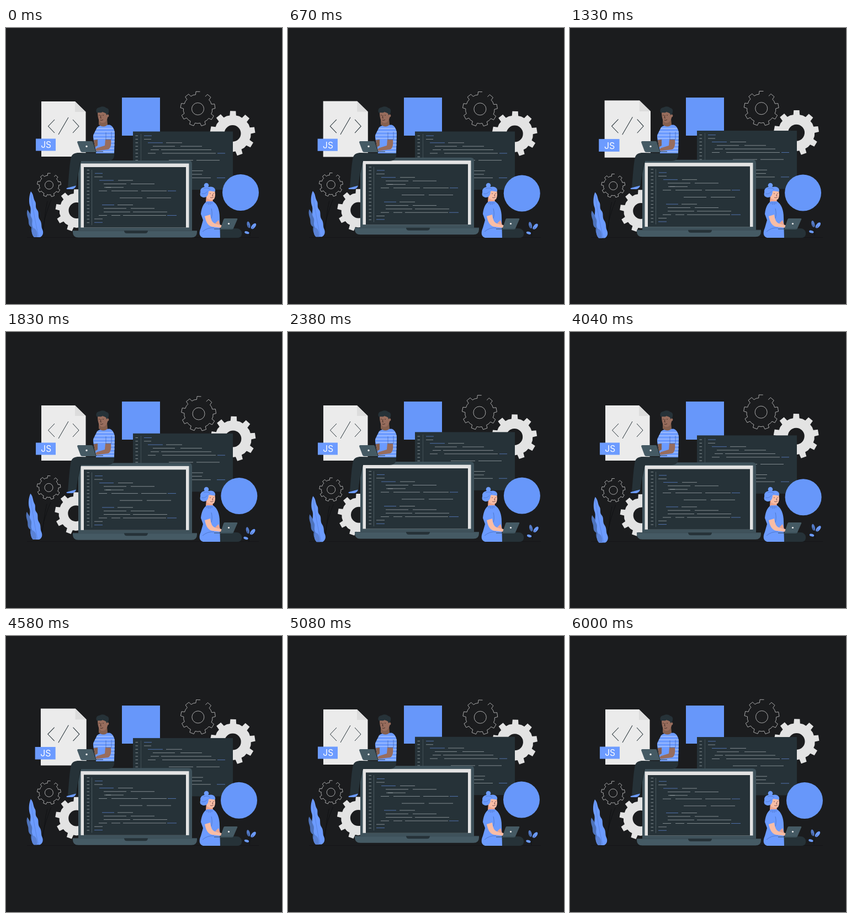
Write an HTML page that moves like this. It is 500 px wide and 500 px high and loops after 6.04 s.

```html
<!DOCTYPE html>
<html lang="en">
<head>
<meta charset="utf-8">
<title>Coding scene</title>
<style>
html, body { margin: 0; width: 100%; height: 100%; overflow: hidden; background: #1b1c1e; }
svg { display: block; width: 100%; height: 100%; }
text { font-family: Inter, "Open Sans", sans-serif; }
</style>
</head>
<body>
<svg viewBox="0 0 500 500">
  <path d="M38 379.5H458" stroke="#131416" stroke-width=".7"/>

  <g id="wind">
    <g id="gears"></g>
    <path d="M65 376C68 350 74 330 82 311M66 376C69 358 70 335 75 314" fill="none" stroke="#101113" stroke-width=".8"/>
    <path d="M55 379C46 375 45 367 46 361C39 357 42 350 40 345C38 339 37 334 39 329C42 334 48 341 49 349C54 355 56 365 60 378Z" fill="#4e73bb"/>
    <path d="M51 379C46 374 47 367 49 362C45 354 50 350 46 343C42 336 47 330 43 321C41 313 42 303 45 296C50 301 49 307 52 313C56 318 52 324 56 329C61 334 57 341 61 347C66 354 63 360 66 365C69 372 66 377 62 379Z" fill="#6c9bff"/>
    <path d="M51 379C46 374 46 367 49 362C56 364 57 371 57 379Z" fill="#5a82d6"/>
    <path d="M45 301C49 327 53 352 59 378" fill="none" stroke="#5079cc" stroke-width=".6"/>
    <ellipse cx="439.5" cy="356.5" rx="2.8" ry="6.2" transform="rotate(-14 439.5 356.5)" fill="#5379c6"/>
    <ellipse cx="448.5" cy="359" rx="3.2" ry="6.3" transform="rotate(40 448.5 359)" fill="#6c9bff"/>
    <ellipse cx="436.3" cy="370.5" rx="4.3" ry="2.3" transform="rotate(16 436 371)" fill="#6c9bff"/>
    <path d="M442 377C442 370 444 365 448 360M442 377C442 370 440 362 439 357" fill="none" stroke="#111214" stroke-width=".5"/>
  </g>

  <g id="doc">
    <path d="M64 133H125L144.500 152V233H64Z" fill="#ebebeb"/>
    <path d="M125 133V152H144.500Z" fill="#dcdcdc"/>
    <path d="M88 166L76.500 178L88 190M113 162L95 193M121 166L132 178L121 190" fill="none" stroke="#263238" stroke-width="1"/>
    <rect x="54" y="200.500" width="36" height="22" fill="#6c9bff"/>
    <text x="72.700" y="217.300" font-size="15.500" text-anchor="middle" fill="#fff">JS</text>
  </g>

  <rect x="210" y="126" width="69" height="69" fill="#6797fa"/>

  <g id="window">
    <rect x="230" y="187.500" width="181" height="105.500" fill="#263238"/>
    <path d="M244.500 192V289" stroke="#57656c" stroke-width=".6"/>
  </g>

  <g id="laptop">
    <path d="M131 368V246Q131 240 137 240H331Q337 240 337 246V368Z" fill="#3f525b"/>
    <rect x="135.500" y="245.500" width="196" height="116" fill="#e3e3e3"/>
    <rect x="141" y="252" width="185" height="109.500" fill="#263238"/>
    <path d="M121 367H346V370Q346 379.500 336 379.500H131Q121 379.500 121 370Z" fill="#455a64"/>
    <path d="M121 367.500H346" stroke="#37474f" stroke-width=".7"/>
    <path d="M214 367H257Q257 372 252 372H219Q214 372 214 367Z" fill="#263238"/>
    <path d="M155.500 257V357" stroke="#68767d" stroke-width=".6"/>
  </g>

  <g id="man">
    <path d="M196 227C197 237 192 241 183 241H136C132 256 129 272 127 289H112C114 268 115 246 118 234C120 228 125 226 132 226Z" fill="#263238"/>
    <path d="M135 241C132 256 129 272 128 286" fill="none" stroke="#151d21" stroke-width=".6"/>
    <path d="M127 285.500L110 290Q108 292 113 292H120Q125 291 127 285.500Z" fill="#6c9bff"/>
    <path d="M165 180C168 177 173 176 179 175.500H188C194 178 197 184 197 192L196 227H163C163 215 157 203 158 194Z" fill="#6c9bff"/>
    <path d="M164 182H194M161 188H197M159 194H197M159 200H197M181 206H197M181 212H197M175 218H196M164 224H196" stroke="#dfe8ff" stroke-width=".8"/>
    <path d="M168 164H183L184 175Q177 182 168 175Z" fill="#85604f"/>
    <path d="M166 151Q166 171 174 172Q183 172 185 158L183 150Z" fill="#986d5d"/>
    <circle cx="184" cy="159" r="2.400" fill="#986d5d"/>
    <path d="M165 154C161 149 165 144 169 144C174 141 179 142 182 145C187 146 187 151 185 156L182 158C182 153 178 154 175 152C171 155 168 152 165 154Z" fill="#263238"/>
    <path d="M169 157V159M176 157V159M172 158L171 163H173M171 167Q174 168 176 166" fill="none" stroke="#33231e" stroke-width=".8"/>
    <path d="M180 202H190C191 210 190 218 185 220L165 222.500C161 222 162 218 166 217L179 213Z" fill="#986d5d"/>
    <path d="M159 203L166 202L166 213L161 216Z" fill="#85604f"/>
    <path d="M181 189V202M191 188V202H180" fill="none" stroke="#3b5da5" stroke-width=".6"/>
    <path d="M131 205H155Q157 205 158 207L164 225H138Q136 225 135 223L129 207Q129 205 131 205Z" fill="#455a64"/>
    <path d="M157 206L163 224H176" fill="none" stroke="#2b3a41" stroke-width="1"/>
    <circle cx="146" cy="214.500" r="1.700" fill="#eee"/>
  </g>

  <g id="woman">
    <path d="M388 363H417C425 363 428 369 427 374Q426 380 419 380H386Z" fill="#263238"/>
    <path d="M363 302H374L375 316Q369 320 362 315Z" fill="#eda68f"/>
    <path d="M364 291H377Q381 303 377 310Q371 314 364 308Z" fill="#f9bda5"/>
    <circle cx="363" cy="285" r="4.300" fill="#6c9bff"/>
    <path d="M353 305C350 301 353 298 352 295C353 288 361 287 367 288C375 286 380 290 379 296C374 297 370 294 367 296C367 302 364 308 357 307Z" fill="#6c9bff"/>
    <path d="M358 291Q366 288 370 293M354 300Q360 302 365 296" fill="none" stroke="#466db9" stroke-width=".6"/>
    <path d="M370 299V301M376 299V301M374 301L375 304H373M370 307Q373 309 376 306" fill="none" stroke="#553238" stroke-width=".7"/>
    <path d="M364 314H375C383 319 387 330 387 343L388 380H357C350 378 349 371 353 362L357 348L353 337C354 327 357 318 364 314Z" fill="#6c9bff"/>
    <path d="M364 315V319M367 315V320M370 315V320M373 315V319M372 327C374 335 373 341 372 345M356 369Q365 361 377 362" fill="none" stroke="#3c61ae" stroke-width=".6"/>
    <path d="M360 341L370 338C371 346 373 352 378 354L390 357Q395 360 390 362L373 360C365 358 362 350 360 341Z" fill="#f9bda5"/>
    <path d="M379 354L385 348L388 357Z" fill="#eda68f"/>
    <path d="M396 345H418Q420 345 419 347L412 363Q411 365 409 365H388L394 347Q395 345 396 345Z" fill="#455a64"/>
    <path d="M377 364H411" stroke="#35464e" stroke-width="1.200"/>
    <circle cx="403.500" cy="354.500" r="1.600" fill="#eee"/>
  </g>

  <circle id="orb" r="33" fill="#6797fa"/>
</svg>
<script>
const LOOP = 6040;
const $ = id => document.getElementById(id);
const add = (parent, tag, attrs) => {
  const el = document.createElementNS("http://www.w3.org/2000/svg", tag);
  for (const key in attrs) el.setAttribute(key, attrs[key]);
  parent.append(el);
};

function gearPath(cx, cy, outer, root, hole, phase, teeth = 9) {
  const pitch = 2 * Math.PI / teeth;
  const point = (r, a) => `${(cx + r * Math.cos(a)).toFixed(2)} ${(cy + r * Math.sin(a)).toFixed(2)}`;
  const points = [];
  for (let i = 0; i < teeth; i++) {
    const a = phase * Math.PI / 180 + i * pitch;
    points.push(point(root, a - pitch * .25), point(outer, a - pitch * .18),
      point(outer, a + pitch * .18), point(root, a + pitch * .25), point(root + .4, a + pitch * .5));
  }
  const ring = `M${cx - hole} ${cy}a${hole} ${hole} 0 1 0 ${2 * hole} 0a${hole} ${hole} 0 1 0 ${-2 * hole} 0Z`;
  return { rim: `M${points.join("L")}Z`, ring };
}

function solidGear(...size) {
  const { rim, ring } = gearPath(...size);
  add($("gears"), "path", { d: rim + ring, fill: "#e3e3e3", "fill-rule": "evenodd" });
}

function lineGear(...size) {
  const { rim, ring } = gearPath(...size);
  const pen = { fill: "none", stroke: "#e6e6e6", "stroke-width": .7 };
  add($("gears"), "path", { ...pen, d: rim, pathLength: 100, "stroke-dasharray": "94 6" });
  add($("gears"), "path", { ...pen, d: ring });
}

lineGear(347.5, 146.5, 31.5, 26, 11, -49);
solidGear(410.5, 191, 41, 33, 15, -49);
lineGear(78, 284.5, 21.5, 17.5, 7.5, -49);
solidGear(128, 330.5, 38.5, 31, 14.5, -50);

// Each row: vertical slot, then start/end pairs; "b" marks a blue stroke.
function codeLines(parent, top, step, rows) {
  for (const row of rows.split(";")) {
    const [slot, ...spans] = row.trim().split(" ");
    const y = top + slot * step;
    for (const span of spans) {
      const [from, to] = span.replace("b", "").split("-");
      add(parent, "path", {
        d: `M${from} ${y}H${to}`, "stroke-width": .75,
        stroke: span.includes("b") ? "#5f86d2" : "#a0a9ac"
      });
    }
  }
}

function ticks(parent, x, top, step, count) {
  for (let i = 0; i < count; i++)
    add(parent, "path", { d: `M${x} ${top + i * step}h4.500`, stroke: "#aab3b6", "stroke-width": .75 });
}

ticks($("window"), 234.5, 195.2, 6.35, 15);
codeLines($("window"), 195.2, 6.35,
  "0 250-264b; 1 250-263; 2 257-284b 290-319; 3 266-306 316-355; 4 262-277 281-372;" +
  "5 257-271 283-380 383-397b; 7 295-339 345-387; 10 320-357; 11 322-355;" +
  "12 335-371 382-397b");
ticks($("laptop"), 146.5, 257.4, 6.35, 16);
codeLines($("laptop"), 257, 6.35,
  "1 161-175b; 2 160-175; 3 169-195b 203-230; 4 177-218 226-269; 5 178-190 181-213;" +
  "6 168-183 191-239 245-291 293-308b; 8 206-247 255-299; 10 174-196b 202-230;" +
  "11 177-218 226-269; 12 177-225 230-292; 13 168-183 191-207 212-290 292-309b;" +
  "14 160-175; 15 160-175b");

// Linear rise from 0 to 1 and back over one period.
const ramp = (t, period) => 1 - Math.abs(1 - 2 * (t % period) / period);
// Linear swing 0, 1, 0, -1, 0 over one period.
const swing = (t, period) => 2 * ramp(t + period / 4, period) - 1;
const easeOut = p => 1 - (1 - p) ** 2;

// Two beats per cycle, each a quick swell and release.
function beat(t) {
  const p = t % 3000 / 3000;
  if (p < .1) return easeOut(p / .1);
  if (p < .3) return 1 - easeOut((p - .1) / .2);
  if (p < .4 || p >= .6) return 0;
  return p < .5 ? easeOut((p - .4) / .1) : 1 - easeOut((p - .5) / .1);
}

function draw(t) {
  const move = (id, value) => $(id).setAttribute("transform", value);
  const turn = 2 * Math.PI * t / 3000;
  move("wind", `rotate(${swing(t, 1500)} 248.500 248)`);
  move("doc", `translate(102 183) scale(${1 + .052 * beat(t)}) translate(-102 -183)`);
  move("laptop", `translate(0 ${-6 * ramp(t, 1500)})`);
  move("window", `translate(0 ${-6.7 * ramp(Math.max(0, t - 1000), 3000)})`);
  move("orb", `translate(${423.5 + 1.5 * Math.cos(turn)} ${298 + 1.5 * Math.sin(turn)})`);
}

const start = performance.now();
function tick() {
  draw((performance.now() - start) % LOOP);
  requestAnimationFrame(tick);
}
tick();
</script>
</body>
</html>
```
